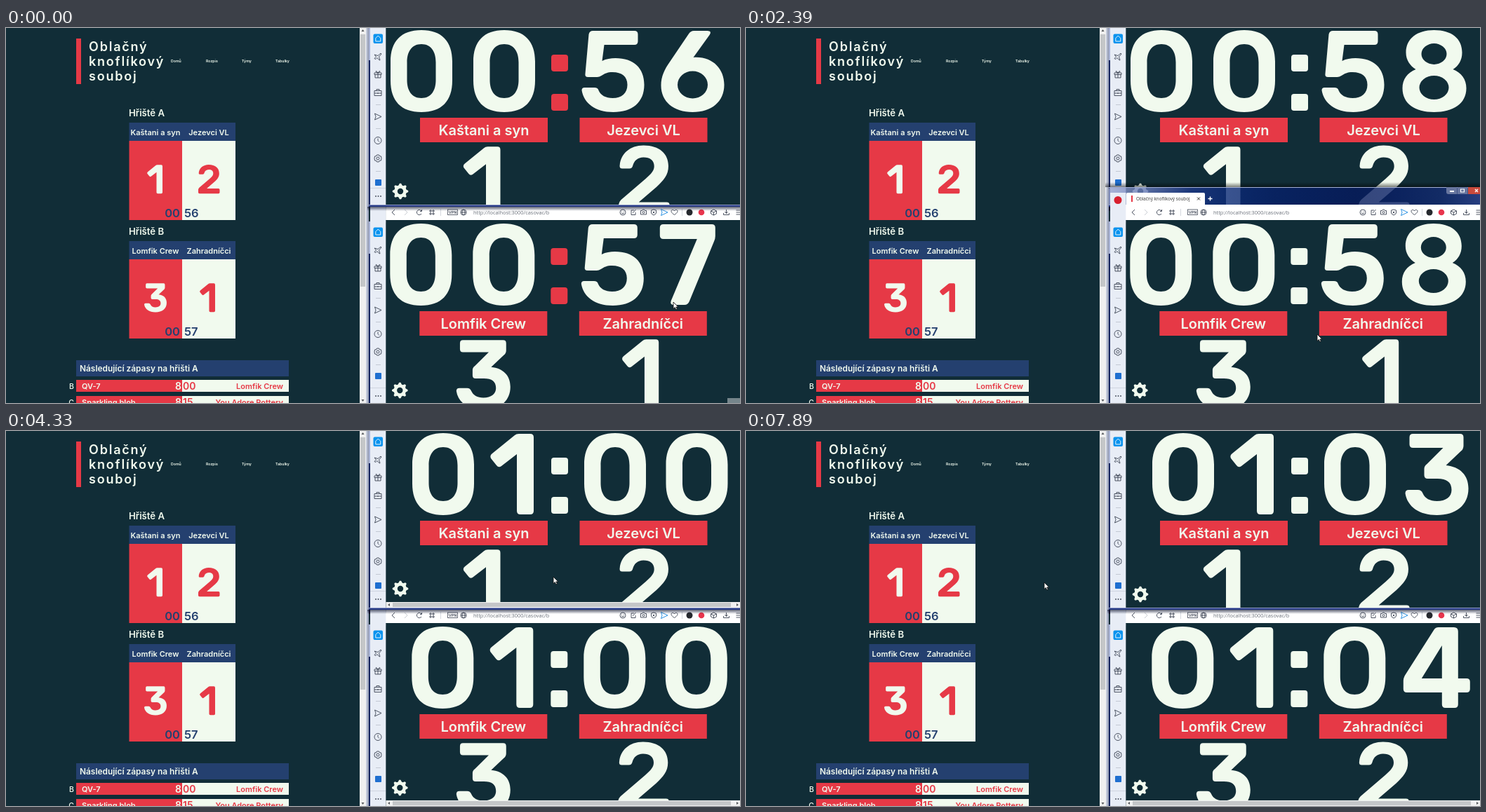
Write an HTML page with a canvas that moves like this. It is 1046 px wide and 535 px high and loops after 8 s.

```html
<!DOCTYPE html>
<html lang="cs">
<head>
<meta charset="utf-8">
<style>
html, body { margin: 0; width: 100%; height: 100%; overflow: hidden; background: #112d37; }
canvas { display: block; width: 1046px; height: 535px; }
</style>
</head>
<body>
<canvas id="stage" width="1046" height="535"></canvas>
<script>
const ctx = document.getElementById('stage').getContext('2d');
const BG = '#112d37', RED = '#e63946', LIGHT = '#f1faee', BLUE = '#24406f';
const INK = '#3d4554', SIDE = '#e8edf6', ACCENT = '#0a93ee';
const UI = 'Inter, sans-serif', CHROME = '"Open Sans", sans-serif';

// Rounded numerals, drawn in a box about 90 wide and 117 high.
const SIX = 'M47 1H66Q73 1 69 7L46 39C73 37 90 55 90 78C90 102 72 117 45 117C18 117 0 102 0 79C0 66 5 56 12 46L39 6Q42 1 47 1ZM23.5 78a21.5 19.5 0 1 0 43 0a21.5 19.5 0 1 0-43 0Z';
const DIGITS = [
  'M44 0C73 0 88 16 88 45V72C88 101 73 117 44 117C15 117 0 101 0 72V45C0 16 15 0 44 0ZM44 20C30 20 23.5 31 23.5 46V71C23.5 86 30 97 44 97C58 97 64.5 86 64.5 71V46C64.5 31 58 20 44 20Z',
  'M41 1H57Q62 1 62 6V111Q62 116 57 116H43Q38 116 38 111V30L16 47Q12 50 9 46L1 36Q-1 32 3 29L35 3Q37 1 41 1Z',
  'M42 0C69 0 84 14 84 35C84 50 76 59 64 70L34 96H81Q86 96 86 101V111Q86 116 81 116H5Q0 116 0 111V101Q0 96 4 92L46 56C55 48 60 43 60 35C60 25 53 20 42 20C32 20 26 26 24 34Q23 39 18 39H6Q1 39 2 33C4 14 19 0 42 0Z',
  'M11 1H78Q83 1 83 6V18Q83 23 79 26L58 46C78 48 90 60 90 79C90 103 72 117 45 117C20 117 3 105 0 86Q0 81 5 81H18Q23 81 25 86C28 93 35 97 45 97C58 97 66 91 66 81C66 70 59 65 46 65H32Q27 65 27 60V51Q27 47 31 44L54 21H11Q6 21 6 16V6Q6 1 11 1Z',
  'M50 1H72Q78 1 78 7V74H90Q95 74 95 79V89Q95 94 90 94H78V111Q78 116 73 116H60Q55 116 55 111V94H5Q0 94 0 89V77Q0 74 2 70L44 4Q46 1 50 1ZM55 27L26 74H55Z',
  'M16 1H75Q80 1 80 6V16Q80 21 75 21H32L29 44C35 41 41 40 48 40C74 40 89 54 89 78C89 103 72 117 45 117C19 117 3 104 0 86Q0 82 4 82H18Q23 82 24 86C27 93 34 97 44 97C57 97 65 90 65 78C65 66 57 60 44 60C36 60 33 62 28 65Q25 67 22 67H9Q4 67 5 62L10 6Q11 1 16 1Z',
  SIX,
  'M5 1H74Q79 1 79 6V18Q79 22 77 26L42 111Q40 116 35 116H20Q14 116 16 110L53 22H5Q0 22 0 17V6Q0 1 5 1Z',
  'M45 0C70 0 85 12 85 32C85 43 80 51 72 56C84 61 91 70 91 83C91 105 72 117 45 117C18 117 0 105 0 83C0 70 7 61 19 56C11 51 5 43 5 32C5 12 21 0 45 0ZM27 34a18 15 0 1 0 36 0a18 15 0 1 0-36 0ZM24 82a21 17 0 1 0 42 0a21 17 0 1 0-42 0Z',
].map(d => new Path2D(d));
DIGITS[9] = new Path2D();
DIGITS[9].addPath(new Path2D(SIX), new DOMMatrix([-1, 0, 0, -1, 90, 117]));
const UNIT_LEFT = [940, 936, 939, 939, 937, 820, 933, 932, 935, 932];

const ICONS = {
  home: 'M-3.5 4V-.5L0-4 3.5-.5V4Z',
  plane: 'M-5-3L0-1.5 4-5 5-4 1.5 0 3 5 1.5 4.5-1 1.5-3 3.5-5 2.5-2.5 0Z',
  gift: 'M-5-2H5V.5H-5ZM-4 .5V5H4V.5M0-2V5M0-2C-5-3-3-7 0-2C3-7 5-3 0-2',
  bag: 'M-5-2.5H5V4.5H-5ZM-2-2.5V-4.5H2V-2.5M-5 1H5M0 0V2',
  send: 'M-4.5-4.5L5 0-4.5 4.5-3 0Z',
  clock: 'M5 0A5 5 0 1 1-5 0A5 5 0 1 1 5 0M0-3V0L2 2',
  cog: 'M2 0A2 2 0 1 1-2 0A2 2 0 1 1 2 0M-1.5-5H1.5L2-3.5 4.5-3 5 0 4.5 3 2 3.5 1.5 5H-1.5L-2 3.5-4.5 3-5 0-4.5-3-2-3.5Z',
  back: 'M2-4L-2 0 2 4',
  forward: 'M-2-4L2 0-2 4',
  reload: 'M3 2A3.6 3.6 0 1 1 3-2M3.5-4V-1.5H1',
  grid: 'M-3-3h2v2h-2zM1-3h2v2h-2zM-3 1h2v2h-2zM1 1h2v2h-2z',
  globe: 'M4 0A4 4 0 1 1-4 0A4 4 0 1 1 4 0M-4 0H4M0-4C-2.5-2-2.5 2 0 4C2.5 2 2.5-2 0-4',
  smile: 'M4 0A4 4 0 1 1-4 0A4 4 0 1 1 4 0M-2 1Q0 3 2 1M-1.5-1.5V-.5M1.5-1.5V-.5',
  edit: 'M1-3H-3V3.5H3V0M-1 1L3.5-4',
  camera: 'M-4-2.5H-2L-1-4H1L2-2.5H4V3H-4ZM1.5 0A1.5 1.5 0 1 1-1.5 0A1.5 1.5 0 1 1 1.5 0',
  shield: 'M0-4L3.5-3V1Q3 3 0 4Q-3 3-3.5 1V-3ZM-1.3-1.3L1.3 1.3M1.3-1.3L-1.3 1.3',
  heart: 'M0 3.5C-9-2-2-6 0-2C2-6 9-2 0 3.5Z',
  cube: 'M0-4L4-2V2L0 4-4 2V-2ZM-4-2L0 0 4-2M0 0V4',
  download: 'M0-4V1.5M-2-1L0 1.5 2-1M-4 1V3.5H4V1',
  menu: 'M-3-3H4M-3 0H4M-3 3H4',
  close: 'M-2-2L2 2M2-2L-2 2',
  plus: 'M-3 0H3M0-3V3',
  square: 'M-2.5-2H2.5V2H-2.5Z',
};
for (const name in ICONS) ICONS[name] = new Path2D(ICONS[name]);

const GEAR = new Path2D();
for (let i = 0; i <= 32; i++) {
  const angle = (i - .5) * Math.PI / 16, r = i % 4 < 2 ? 11.3 : 8.8;
  GEAR.lineTo(r * Math.cos(angle), r * Math.sin(angle));
}
GEAR.closePath();
GEAR.moveTo(4.2, 0);
GEAR.arc(0, 0, 4.2, 0, 7);
const POINTER = new Path2D('M0 0V10L2.4 7.9 4 11.4 5.7 10.6 4.1 7.3H7.2Z');

function box(x, y, w, h, color) {
  ctx.fillStyle = color;
  ctx.fillRect(x, y, w, h);
}
function rounded(x, y, w, h, r, color) {
  ctx.fillStyle = color;
  ctx.beginPath();
  ctx.roundRect(x, y, w, h, r);
  ctx.fill();
}
function dot(x, y, r, color) {
  rounded(x - r, y - r, 2 * r, 2 * r, r, color);
}
function label(text, x, y, size, color = LIGHT, align = 'left', weight = 600, family = UI) {
  ctx.font = `${weight} ${size}px ${family}`;
  ctx.fillStyle = color;
  ctx.textAlign = align;
  ctx.fillText(text, x, y);
}
function shape(path, x, y, scale, fill, stroke, width = 1) {
  ctx.save();
  ctx.translate(x, y);
  ctx.scale(scale, scale);
  if (fill) { ctx.fillStyle = fill; ctx.fill(path, 'evenodd'); }
  if (stroke) { ctx.strokeStyle = stroke; ctx.lineWidth = width; ctx.stroke(path); }
  ctx.restore();
}
const digit = (n, x, y, scale = 1, color = LIGHT) => shape(DIGITS[n], x, y, scale, color);
const icon = (name, x, y, color = INK, width = .9) => shape(ICONS[name], x, y, 1, null, color, width);
function gradient(x0, y0, x1, y1, ...colors) {
  const g = ctx.createLinearGradient(x0, y0, x1, y1);
  colors.forEach((c, i) => g.addColorStop(i / (colors.length - 1), c));
  return g;
}
function clipped(x, y, w, h, draw) {
  ctx.save();
  ctx.beginPath();
  ctx.rect(x, y, w, h);
  ctx.clip();
  draw();
  ctx.restore();
}
function arrow(x, y, dx, dy) {
  ctx.fillStyle = '#55585c';
  ctx.beginPath();
  ctx.moveTo(x + 2 * dx, y + 2 * dy);
  ctx.lineTo(x - dx + 2 * dy, y - dy + 2 * dx);
  ctx.lineTo(x - dx - 2 * dy, y - dy - 2 * dx);
  ctx.fill();
}

const FIELDS = [
  { name: 'A', teams: ['Kaštani a syn', 'Jezevci VL'], score: [1, 2], sec: '56', y: 135 },
  { name: 'B', teams: ['Lomfik Crew', 'Zahradníčci'], score: [3, 1], sec: '57', y: 304 },
];
const MATCHES = [
  ['B', 'QV-7', '00', 'Lomfik Crew', 502],
  ['C', 'Sparkling blob', '15', 'You Adore Pottery', 525],
];

function fieldCard({ name, teams, score, sec, y }) {
  label('Hřiště ' + name, 175, y - 9, 13.2);
  box(175.5, y, 151.5, 26, BLUE);
  box(175.5, y + 26, 75.5, 113, RED);
  box(251, y + 26, 76, 113, LIGHT);
  teams.forEach((team, i) => label(team, 213 + 76 * i, y + 18, 11, LIGHT, 'center'));
  digit(score[0], score[0] === 1 ? 201 : 197, y + 60, .355);
  digit(score[1], score[1] === 1 ? 276 : 274, y + 60, .355, RED);
  label('00', 248, y + 134.5, 16.5, BLUE, 'right');
  label(sec, 254, y + 134.5, 16.5, BLUE);
}

function scoreboardPage() {
  box(0, 0, 504, 535, BG);
  box(100, 15, 7, 65, RED);
  ctx.letterSpacing = '1.8px';
  ['Oblačný', 'knoflíkový', 'souboj'].forEach((line, i) => label(line, 118, 32.5 + 21.4 * i, 18));
  ctx.letterSpacing = '0px';
  [['Domů', 235], ['Rozpis', 285], ['Týmy', 336], ['Tabulky', 384]].forEach(([s, x]) => label(s, x, 49, 5.2));
  FIELDS.forEach(fieldCard);
  box(100, 474, 303, 23, BLUE);
  label('Následující zápasy na hřišti A', 105, 489.5, 11.9);
  for (const [group, home, minute, guest, y] of MATCHES) {
    label(group, 97, y + 13, 10.5, LIGHT, 'right', 500);
    box(100, y, 151, 17, RED);
    box(251, y, 152, 17, LIGHT);
    label(home, 108, y + 12.5, 11);
    label('8', 250, y + 13.5, 14, LIGHT, 'right');
    label(minute, 252, y + 13.5, 14, RED);
    label(guest, 395, y + 12.5, 11, RED, 'right');
  }
  box(504, 0, 9, 535, '#f0f0f0');
  box(505, 9, 7, 360, '#c4c6c8');
  arrow(508.5, 4, 0, -1);
  arrow(508.5, 531, 0, 1);
  box(513, 0, 4, 535, gradient(513, 0, 517, 0, '#d3d9e8', '#8b93ab'));
}

function sidebar(y, bottom, dotsY) {
  clipped(517, y - 25, 25, bottom - y + 25, () => {
    box(517, y, 2, 46, '#a9b4d6');
    box(517, y + 46, 2, 300, '#17265f');
    box(519, y, 22.5, 300, SIDE);
    rounded(523.5, y + 8.5, 13.5, 13.5, 2, ACCENT);
    icon('home', 530.3, y + 15, '#fff');
    [['plane', 41], ['gift', 66], ['bag', 92], ['send', 126.5], ['clock', 160.5], ['cog', 186]]
      .forEach(([name, dy]) => icon(name, 530, y + dy));
    [109, 143, 204].forEach(dy => box(527, y + dy, 7, 1, '#c3c9d4'));
    rounded(526, y + 216, 9, 9, 1, '#1f6fd0');
    box(519, dotsY - 12, 22, 1, '#cfd5e0');
    [-3.5, 0, 3.5].forEach(dx => dot(530.5 + dx, dotsY, .9, INK));
  });
}

function timerPage(x, y, bottom, { seconds, running, score }, teams) {
  const wide = seconds === 60 || seconds === 64;
  const end = wide ? bottom - 8 : bottom;
  const past = seconds >= 60, s = seconds % 60;
  const top = y === 0 ? 3 : 279;
  clipped(541.5, y, 505, bottom - y, () => {
    box(541, y, 505, bottom - y, BG);
    clipped(541, y, 505, end - y, () => {
      ctx.translate(x, 0);
      digit(0, past ? 579 : 548, top);
      past ? digit(1, 690, top) : digit(0, 666, top);
      [35, 91].forEach(dy => rounded(777, top + dy, 24, 24, 4, running ? LIGHT : RED));
      past ? digit(0, 824, top) : digit(5, 820.5, top);
      digit(s % 10, UNIT_LEFT[s % 10] + .5, top);
      teams.forEach((team, i) => {
        box(590 + 227.5 * i, top + 125, 182, 35, RED);
        label(team, 681 + 227.5 * i, top + 150, 20, LIGHT, 'center');
      });
      digit(score[0], score[0] === 1 ? 651.5 : 642.5, top + 165.5, .855);
      digit(score[1], score[1] === 1 ? 878.5 : 873, top + 164.5, .845);
      shape(GEAR, 562, end - (y === 0 ? 19 : 18), 1, LIGHT);
    });
    if (wide) {
      box(541, end, 505, 8, '#f0f0f0');
      box(551, end + 1, 482, 6, '#c4c6c8');
      arrow(546, end + 4, -1, 0);
      arrow(1042, end + 4, 1, 0);
    }
  });
}

function titleBar() {
  box(512, 220, 534, 7, gradient(0, 220, 0, 227, 'rgba(0,0,0,0)', 'rgba(0,0,0,.5)'));
  // Tinted glass: the page behind stays faintly visible.
  ctx.globalAlpha = .8;
  rounded(517, 227, 540, 25, [4, 0, 0, 0], gradient(517, 0, 1046, 0,
    '#9aa5cf', '#6073b4', '#1c3889', '#0a2876', '#06206a', '#051c64', '#05195e', '#0a2068', '#122a70', '#2c4291'));
  ctx.globalAlpha = 1;
  box(517, 227, 529, 1, '#a4b0d6');
  box(519, 235, 22.5, 20, SIDE);
  dot(530, 245.5, 5.5, '#d8202f');
  rounded(542, 235, 112, 18, [2, 2, 0, 0], '#fff');
  box(549, 239, 2, 9, RED);
  label('Oblačný knoflíkový souboj', 556, 246, 6.3, '#333', 'left', 400, CHROME);
  icon('close', 645, 243.5, '#333', 1);
  icon('plus', 661.5, 243.5, '#fff', 1.4);
  rounded(998, 227, 15, 10, [0, 0, 0, 3], '#68769f');
  box(1013.5, 227, 15, 10, '#68769f');
  box(1029, 227, 20, 10, '#c94a3c');
  box(1003, 232, 6, 2, '#fff');
  icon('square', 1021, 232, '#fff', 1.2);
  icon('close', 1041, 232, '#fff', 1.4);
}

function toolbar() {
  box(541.5, 252, 505, 22, '#fff');
  [['back', 552], ['reload', 589], ['grid', 607], ['globe', 652], ['smile', 879], ['edit', 894], ['camera', 908.5],
    ['shield', 923], ['heart', 952.5], ['cube', 1008.5], ['download', 1026.5], ['menu', 1043.5]]
    .forEach(([name, x]) => icon(name, x, 263));
  icon('forward', 570, 263, '#c5c9d0');
  icon('send', 938, 263, '#1687df');
  [619, 963].forEach(x => box(x, 258, 1, 10, '#d5d9df'));
  ctx.strokeStyle = INK;
  ctx.lineWidth = .8;
  ctx.strokeRect(629.5, 259, 14, 7.5);
  label('VPN', 636.5, 265, 5.4, INK, 'center');
  label('http://localhost:3000/casovac/b', 666, 265.7, 7.4, '#6a707a', 'left', 400, CHROME);
  dot(974, 263, 4.5, '#25282d');
  dot(991, 263, 4.3, '#e8354d');
}

function upperWindow(timer, front) {
  sidebar(0, 252, 240);
  timerPage(0, 0, 252, timer, FIELDS[0].teams);
  if (!front) return;
  box(517, 252, 529, 1, '#8f9ac4');
  box(517, 253, 529, 2, '#263a86');
  box(515, 255, 531, 6, gradient(0, 255, 0, 261, 'rgba(5,12,40,.65)', 'rgba(5,12,40,0)'));
}

function lowerWindow(timer, front) {
  if (front) titleBar();
  sidebar(276, 535, 525);
  box(519, 252, 22.5, 25, SIDE);
  toolbar();
  timerPage(-.7, 274, 535, timer, FIELDS[1].teams);
}

const UPPER_TICKS = [1260, 2260, 3260, 4290, 5260, 6290, 7290];
const LOWER_TICKS = [1640, 2720, 3610, 4660, 5680, 6660, 7690];
const passed = (ticks, t) => ticks.filter(at => t >= at).length;

// time, x, y of the pointer tip
const POINTER_PATH = [
  [0, 951, 391], [720, 951, 391], [1320, 831, 469], [1580, 831, 469], [1710, 809, 447], [2050, 809, 447],
  [2390, 814, 437], [3530, 814, 437], [3670, 779, 240], [3950, 779, 240], [4150, 780, 208], [5260, 780, 208],
  [5800, 348, 275], [6020, 368, 264], [6490, 368, 264], [6690, 424, 215], [7690, 424, 215], [7890, 425, 216], [8000, 425, 216],
];
function pointerAt(t) {
  const i = POINTER_PATH.findIndex(([at]) => at > t);
  const [t0, x0, y0] = POINTER_PATH[i - 1], [t1, x1, y1] = POINTER_PATH[i];
  const k = (t - t0) / (t1 - t0);
  return [x0 + (x1 - x0) * k, y0 + (y1 - y0) * k];
}

function render(t) {
  const upper = { seconds: 56 + passed(UPPER_TICKS, t), running: t >= 260, score: [1, 2] };
  const lower = { seconds: 57 + passed(LOWER_TICKS, t), running: t >= 720, score: [3, t >= 2850 ? 2 : 1] };
  const lowerFront = t >= 460 && t < 4060;
  scoreboardPage();
  if (lowerFront) {
    upperWindow(upper, false);
    lowerWindow(lower, true);
  } else {
    lowerWindow(lower, false);
    upperWindow(upper, true);
  }
  if (t < 460) box(1028, 528, 18, 7, '#75858b');
  shape(POINTER, ...pointerAt(t), .95, '#fff', '#111', .9);
}

function loop() {
  render(performance.now() % 8000);
  requestAnimationFrame(loop);
}
loop();
</script>
</body>
</html>
```
